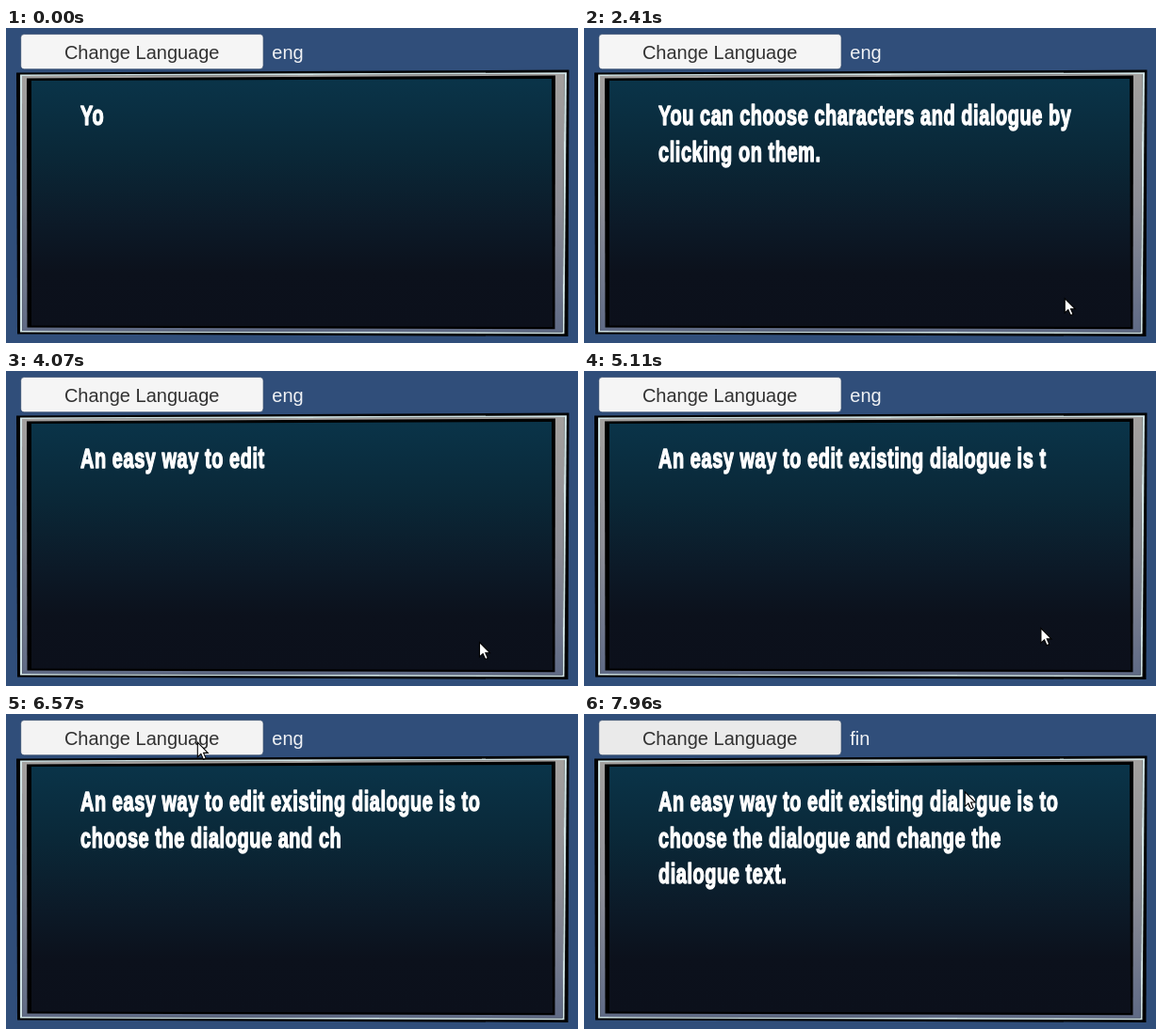
An HTML page for the animation above (7.99 s loop, 607 px wide and 335 px high).

```html
<!DOCTYPE html>
<html lang="en">
<head>
<meta charset="utf-8">
<title>Dialogue box</title>
<style>
  html, body { margin: 0; width: 100%; height: 100%; overflow: hidden; background: #304e7a; }
  svg { display: block; width: 100%; height: 100%; }
  text { font-family: "Liberation Sans", Arial, sans-serif; font-size: 20px; }
  #lines text {
    font-size: 29.5px; font-weight: bold; letter-spacing: .85px;
    fill: #fff; stroke: #fff; stroke-width: 1.5; stroke-linejoin: round;
  }
</style>
</head>
<body>
<svg viewBox="0 0 607 335">
  <defs>
    <linearGradient id="panel" x1="0" y1="0" x2="0" y2="1">
      <stop offset="0" stop-color="#0a3449"/>
      <stop offset=".3" stop-color="#0a2838"/>
      <stop offset=".58" stop-color="#0c1a28"/>
      <stop offset=".78" stop-color="#0c111c"/>
      <stop offset="1" stop-color="#0c101b"/>
    </linearGradient>
    <linearGradient id="metal" x1="0" y1="0" x2="0" y2="1">
      <stop offset="0" stop-color="#a3a09e"/>
      <stop offset=".5" stop-color="#8d8e96"/>
      <stop offset="1" stop-color="#5f6a85"/>
    </linearGradient>
  </defs>
  <rect width="607" height="335" fill="#304e7a"/>
  <polygon points="11,47.5 597.5,44.5 596.5,328 12,325.5"/>
  <polygon points="15,49.5 595,47.3 592.5,325.3 15,323.5" fill="#cfe2e4"/>
  <polygon points="17,51 592.5,49 590.7,323.6 17.3,322"/>
  <polygon points="17,51 592.5,49 590.7,323.6 17.3,322" fill="url(#metal)"/>
  <polygon points="22,53.5 583,50.5 582.5,320.3 22.5,318.5"/>
  <polygon points="27,56 579,54 580,318 27,316.5" fill="url(#panel)"/>

  <rect id="button" x="15.7" y="6.6" width="257.4" height="37.2" rx="4" stroke="#273f62" stroke-width=".7"/>
  <text x="144.2" y="32.8" text-anchor="middle" fill="#323232">Change Language</text>
  <text id="lang" x="282.3" y="32.8" fill="#f0f2f5"></text>

  <g id="lines" transform="translate(79 0) scale(.676 1)">
    <text y="103"/>
    <text y="141.6"/>
    <text y="180.2"/>
  </g>
  <path id="cursor" d="M0 0V15.5L3.6 12.2L6.2 18L8.8 16.9L6.3 11.2H11Z" fill="#fff" stroke="#000" stroke-width="1.1"/>
</svg>
<script>
const LOOP = 7990, SECOND_PAGE = 3520, CURSOR_IN = 2250, HOVER = 6550, CLICK = 7120;
const LINE_WIDTH = 666;
const $ = id => document.getElementById(id);
const rows = [...document.querySelectorAll('#lines text')];
const ramp = (t, from, to) => Math.min(1, Math.max(0, (t - from) / (to - from)));

const first = 'You can choose characters and dialogue by clicking on them.';
const second = 'An easy way to edit existing dialogue is to choose the dialogue and change the dialogue text.';

// Typing slows down while the pointer is moving: [time, letters typed]
const pace = [[SECOND_PAGE, 1], [4065, 19.3], [5855, 59.3], [7325, 82.3], [7900, 93]];

const glides = [
  { from: CURSOR_IN, to: 2400, x: 510.2, y: 287.5 },
  { from: 3010, to: 3270, x: 502.5, y: 288.5 },
  { from: 5050, to: 5850, x: 272, y: 94.5 },
  { from: 6000, to: 6650, x: 193.8, y: 21.3 },
  { from: 7400, to: 7930, x: 404.3, y: 82.8 }
];

function typed(t) {
  if (t < SECOND_PAGE) return first.slice(0, 2 + t / 37.5);
  let n = pace[0][1];
  for (let i = 1; i < pace.length; i++) {
    const [t0, a] = pace[i - 1], [t1, b] = pace[i];
    n += (b - a) * ramp(t, t0, t1);
  }
  return second.slice(0, Math.floor(n + .01));
}

// Greedy wrap: a word drops to the next row as soon as it overflows
function write(text) {
  rows.forEach(row => { row.textContent = ''; });
  let i = 0;
  for (const word of text.split(' ')) {
    const before = rows[i].textContent;
    rows[i].textContent = before ? before + ' ' + word : word;
    if (before && rows[i].getComputedTextLength() > LINE_WIDTH) {
      rows[i].textContent = before;
      rows[++i].textContent = word;
    }
  }
}

function pointer(t) {
  let x = 579, y = 262;
  for (const g of glides) {
    const k = ramp(t, g.from, g.to);
    x += (g.x - x) * k;
    y += (g.y - y) * k;
  }
  return `translate(${x} ${y})`;
}

function draw(t) {
  write(typed(t));
  $('lang').textContent = t < CLICK ? 'eng' : 'fin';

  const press = 1 - ramp(Math.abs(t - CLICK), 0, 100);
  const grey = Math.round(245 - 11 * ramp(t, HOVER, HOVER + 100) - 34 * press);
  $('button').setAttribute('fill', `rgb(${grey},${grey},${grey})`);

  $('cursor').setAttribute('visibility', t < CURSOR_IN ? 'hidden' : 'visible');
  $('cursor').setAttribute('transform', pointer(t));
}

const begin = performance.now();
function tick() {
  draw((performance.now() - begin) % LOOP);
  requestAnimationFrame(tick);
}
tick();
</script>
</body>
</html>
```
